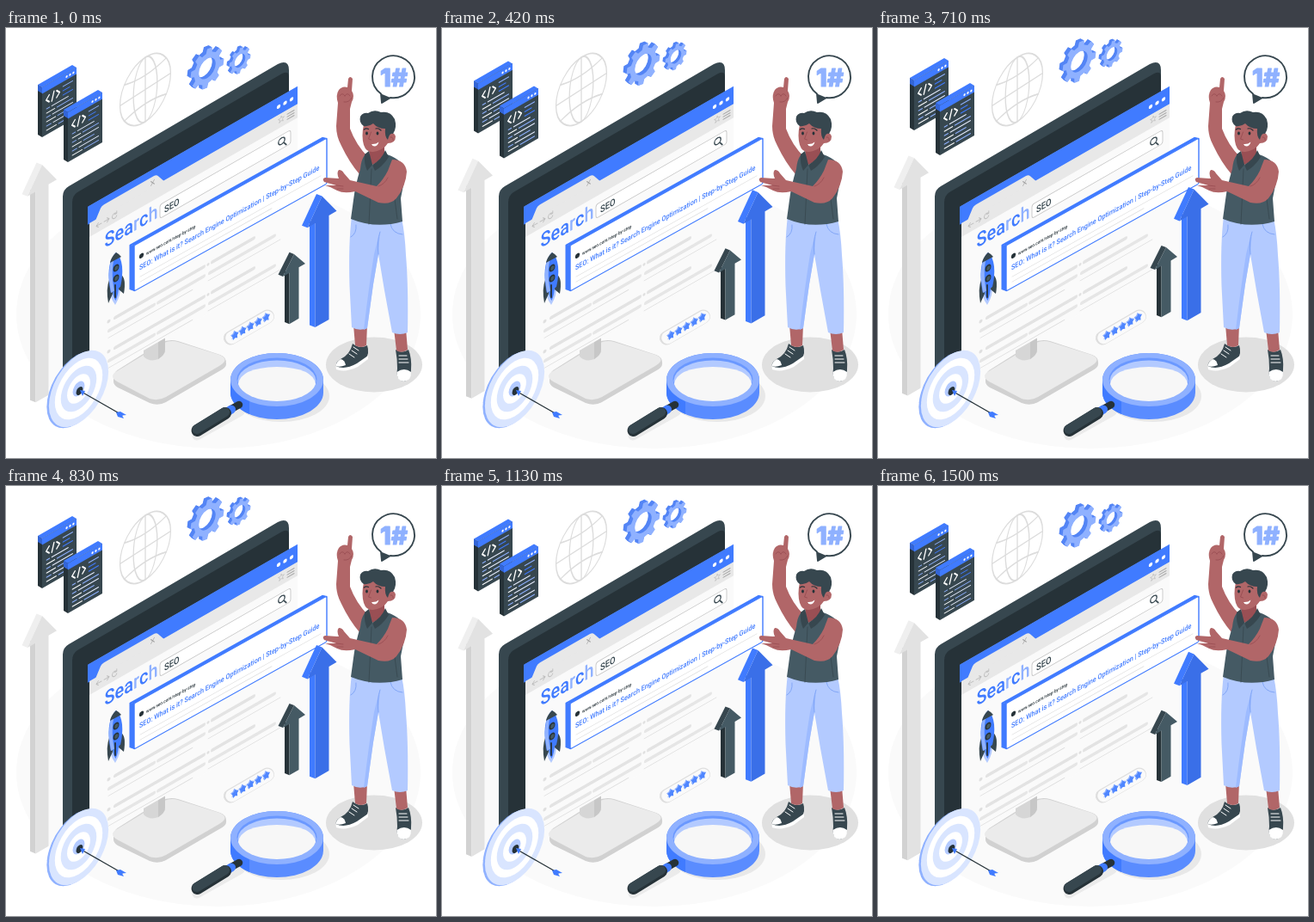
An HTML page for the animation above (1540 ms loop, 500 px wide and 500 px high).

```html
<!DOCTYPE html>
<html lang="en">
<head>
<meta charset="utf-8">
<title>SEO</title>
<style>
html, body { margin: 0; width: 100%; height: 100%; overflow: hidden; background: #fff; }
svg { display: block; width: 100vw; height: 100vh; }
text { font-family: Roboto, sans-serif; font-weight: 500; }
</style>
</head>
<body>
<svg viewBox="0 0 500 500" id="stage"></svg>
<script>
const LOOP = 1540, LIFT = 8;
const BLUE = '#407bff', DEEP = '#3365d6', SOFT = '#8fb1ff', PALE = '#b3caff', MIST = '#d9e5ff';
const INK = '#263238', SLATE = '#37474f', STEEL = '#455a64', SKIN = '#b16668', SHADE = '#9a4f54';

const path = (d, fill, more = '') => `<path d="${d}" fill="${fill}" ${more}/>`;
const line = (d, color, w = 1, more = '') =>
  path(d, 'none', `stroke="${color}" stroke-width="${w}" stroke-linecap="round" stroke-linejoin="round" ${more}`);
const poly = (pts, fill) => path('M' + pts.map(p => p.join(' ')).join('L') + 'Z', fill);
const oval = (x, y, rx, ry, fill, more = '') =>
  `<ellipse cx="${x}" cy="${y}" rx="${rx}" ry="${ry}" fill="${fill}" ${more}/>`;
const dot = (x, y, r, fill, more) => oval(x, y, r, r, fill, more);
const rect = (x, y, w, h, fill, more = '') =>
  `<rect x="${x}" y="${y}" width="${w}" height="${h}" fill="${fill}" ${more}/>`;
const group = (t, s) => `<g transform="${t}">${s}</g>`;
const bob = s => `<g class="bob">${s}</g>`;
const iso = (x, y, s) => group(`matrix(.866 -.5 0 1 ${x} ${y})`, s);
const label = (x, y, size, fill, s, weight = 500) =>
  group(`translate(${x} ${y}) scale(.866 1)`,
    `<text font-size="${size}" fill="${fill}" font-weight="${weight}">${s}</text>`);

// Extruded arrow pointing up; x, y is the front tip.
function arrow(x, y, w, tip, b, h, depth, front, side, headSide = side) {
  const at = (dx, dy) => [x + dx, y + dy - dx * .577];
  const back = ([px, py]) => [px - depth, py - depth * .4];
  const top = at(0, 0), left = at(-w, tip), neck = at(-b, tip), foot = at(-b, h);
  return poly([neck, foot, back(foot), back(neck)], side) +
    poly([top, left, back(left), back(top)], headSide) +
    poly([top, at(w, tip), at(b, tip), at(b, h), foot, neck, left], front);
}

function gear(x, y, r, teeth, depth) {
  const pts = [];
  for (let i = 0; i < teeth; i++) {
    [[-.3, .78], [-.19, 1], [.19, 1], [.3, .78]].forEach(([o, k]) => {
      const a = (i + o) / teeth * Math.PI * 2 + .15;
      pts.push((Math.cos(a) * r * k).toFixed(2) + ' ' + (Math.sin(a) * r * k).toFixed(2));
    });
  }
  const q = r * .5;
  const d = `M${pts.join('L')}ZM${q} 0A${q} ${q} 0 1 0 ${-q} 0A${q} ${q} 0 1 0 ${q} 0Z`;
  let s = '';
  for (let i = depth; i >= 0; i -= .5)
    s += iso(x - i, y - i * .55, path(d, i ? '#5485f5' : SOFT, 'fill-rule="evenodd"'));
  return s;
}

function codeWindow(x, y) {
  const p = (dx, dy) => [x + dx, y + dy];
  const s = poly([p(0, 0), p(-5, -3), p(-5, 55), p(0, 58)], INK) +
    poly([p(0, 0), p(-5, -3), p(35, -26), p(40, -23)], BLUE) +
    poly([p(0, 0), p(-5, -3), p(-5, 4), p(0, 7)], DEEP);
  let f = rect(0, 0, 46.2, 58, SLATE) + rect(0, 0, 46.2, 7.5, BLUE);
  [33, 37.5, 42].forEach(u => f += dot(u, 4, 1.3, '#fff'));
  f += line('M9.500 13.500L5.500 17.500L9.500 21.500M13 22.500L16 12.500M19.500 13.500L23.500 17.500L19.500 21.500', '#fff', 1.7);
  for (let i = 0; i < 3; i++) f += line(`M28 ${13 + i * 5}h${13 - i % 2 * 4}`, i ? BLUE : SOFT, 1.1);
  for (let i = 0; i < 6; i++) {
    const v = 28 + i * 5, cut = 10 + i * 7 % 13;
    f += line(`M6 ${v}H${cut}`, i % 2 ? '#fff' : SOFT, 1.1) +
      line(`M${cut + 3} ${v}H${i % 3 ? 41 : 35}`, i % 2 ? SOFT : '#e8eeff', 1.1);
  }
  return s + iso(x, y, f);
}

function star(x, y, r) {
  const pts = Array.from({ length: 10 }, (_, i) => {
    const a = i * Math.PI / 5 - Math.PI / 2, k = i % 2 ? r * .55 : r;
    return [Math.cos(a) * k, Math.sin(a) * k];
  });
  return iso(x - 1.2, y - .7, poly(pts, SOFT)) + iso(x, y, poly(pts, '#4f86ff'));
}

function globe() {
  const s = dot(0, 0, 34, 'none') + oval(0, 0, 16, 34, 'none') +
    line('M0 -34V34M-34 0H34M-28 -19Q0 -11 28 -19M-28 19Q0 11 28 19', '#dcdcdc', 1.5);
  return group('matrix(.866 -.56 0 1.1 162 71.5)', `<g stroke="#dcdcdc" stroke-width="1.5">${s}</g>`);
}

function monitor() {
  return path('M66 196Q66 188 73 184L316 42Q329 36 329 49V262L66 414Z', SLATE) +
    path('M77 203Q77 195 83 191L321 53Q329 49 329 57V262L77 408Z', INK) +
    path('M125 411V405Q125 400 134 395L180 366Q190 361 200 364L249 380Q257 383 256 391Q256 395 248 399L186 435Q177 440 167 436L130 418Q125 415 125 411Z', '#d1d1d1') +
    path('M129 399L180 368Q190 362 200 365L248 380Q261 385 248 393L186 429Q177 434 167 431L129 411Q119 405 129 399Z', '#ebebeb') +
    path('M160 372V382Q167 389 177 385Q185 380 185 374V355Z', '#d6d6d6') +
    path('M177 360V385Q185 380 185 374V352Z', '#c7c7c7');
}

function rocket() {
  return path('M122 303Q120 313 127 322Q134 311 133 298Z', PALE) +
    path('M124 304Q124 312 127.500 317Q131 309 131 300Z', BLUE) +
    path('M120 293Q116 303 119 320L124 309L123 300ZM134 287Q140 291 137 309L131 304L132 294Z', SLATE) +
    path('M128 261C118 271 118 290 122 308L133 301C137 284 136 268 128 261Z', BLUE) +
    path('M128 261C121 267 119.500 280 120 294L122 308L126 305.500C122.500 290 123 272 128 261Z', SOFT) +
    path('M128 261C123 266 121.500 270 121 273L134 266Q132 263 128 261Z', SLATE) +
    [279, 291].map(y => iso(128, y, dot(0, 0, 4, INK) + dot(.5, .3, 2.5, STEEL))).join('') +
    line('M127 299V313', INK, 1.8);
}

function page() {
  let s = rect(0, 0, 242, 204, '#fafafa') + rect(-2, -.5, 244, 21, BLUE) +
    rect(0, 20, 242, 16, '#e8e8e8') +
    path('M7 21L13 10Q14 8 17 8H75Q78 8 80 11L87 21Z', '#e8e8e8');
  [220, 227.5, 235].forEach(u => s += dot(u, 10.5, 2.2, '#fff'));
  s += line('M71.500 12.500l4 5m0 -5l-4 5', '#a6a6a6', .9) +
    line('M8 28h6m-6 0l2.500 -2.500m-2.500 2.500l2.500 2.500M17 28h6m0 0l-2.500 -2.500m2.500 2.500l-2.500 2.500', '#bdbdbd', .9) +
    line('M31.500 26.500a2.700 3 0 1 0 .3 2.500m0 -5v2.600h-2.500', '#bdbdbd', .9) +
    line('M223 23l1 2.400h2.500l-2 1.800l.8 2.800l-2.300 -1.600l-2.300 1.600l.8 -2.800l-2 -1.800h2.500Z', '#c4c4c4', .8) +
    line('M230 25h8m-8 3h8m-8 3h8', '#a6a6a6', 1.1);
  s += rect(82, 45.5, 152, 16, '#fff', 'rx="3" stroke="#c7c7c7" stroke-width=".9"') +
    label(87, 58, 11, SLATE, 'SEO', 700) +
    dot(223.5, 52.5, 3.7, 'none', `stroke="${SLATE}" stroke-width="1.3"`) + line('M226.300 56l2.700 4', SLATE, 1.3);
  const tints = [BLUE, BLUE, BLUE, SOFT, BLUE, SOFT];
  s += label(17.5, 59, 23, BLUE,
    [...'Search'].map((c, i) => `<tspan fill="${tints[i]}">${c}</tspan>`).join(''), 700);
  [147, 182].forEach(v => {
    s += dot(22.5, v, 2, '#e0e0e0') + line(`M30 ${v}H133`, '#e3e3e3', 4) +
      line(`M23 ${v + 11}H75M80 ${v + 11}H133`, '#e6e6e6', 4) + line(`M22 ${v + 19}H120`, '#dcdcdc', .8);
    s += dot(138, v, 1.6, '#e0e0e0') + line(`M143 ${v}H191`, '#e3e3e3', 4) +
      line(`M140 ${v + 11}H215`, '#e6e6e6', 4) + line(`M138 ${v + 19}H222`, '#dcdcdc', .8);
  });
  return group('matrix(1 -.573 0 1 97 207)', s);
}

function card() {
  const s = path('M0 0L-5 -3Q-6 -4 -5 -4H219L224 0ZM-5.500 -3.500V48L0 53V0Z', BLUE) +
    rect(0, 0, 224, 53, '#fff', `rx="1.5" stroke="${BLUE}" stroke-width="1.4"`) +
    dot(8.5, 16.5, 2.7, INK) +
    label(14, 19, 5.4, INK, 'www.seo.com/step-by-step') +
    label(6, 32, 8.35, BLUE, 'SEO: What is it? Search Engine Optimization | Step-by-Step Guide', 700) +
    line('M7 40H217M7 46H160', '#e0e0e0', .9);
  return group('matrix(1 -.558 0 1 149 253)', s);
}

function rating() {
  let s = line('M261 360.500L304 335.500', '#dedede', 16) + line('M262.500 360L304 336', '#fafafa', 14.5);
  for (let i = 0; i < 5; i++) s += star(266.5 + i * 9.1, 357.5 - i * 5.2, 5.2);
  return s;
}

function target() {
  const rings = [[40, MIST], [32, '#fff'], [24, MIST], [15.5, '#fff'], [8, PALE]];
  return iso(82, 420.5, dot(0, 0, 40, SOFT)) +
    iso(84.5, 419.5, rings.map(([r, c]) => dot(0, 0, r, c)).join('')) +
    iso(85.5, 422, dot(0, 0, 4.5, INK)) +
    line('M86 422L135 450', INK, 1.3) +
    path('M86 421L92 422L89 428Z', BLUE) +
    path('M128 447L133 446L140 450L135 450.500L137 454L130 452Z', BLUE);
}

function lens() {
  const ring = 'M261 409A54 31 0 0 1 369 409V424A54 31 0 0 1 261 424Z';
  return oval(320, 428, 56, 30, '#e8e8e8') + line('M222 474L272 446', '#ebebeb', 11) +
    path(ring, '#5a8cff') + path('M261 409V424A54 31 0 0 0 283 449V433Z', BLUE) +
    oval(315, 409, 54, 31, SOFT) +
    oval(315, 408.5, 46.5, 25, '#6a98ff') +
    oval(315, 410, 45.5, 23.5, PALE) +
    path('M270 414A45.500 23.500 0 0 0 360 414Q357 395 315 394Q273 395 270 414Z', '#f7f7f7') +
    line('M271 438L262 443', INK, 8.5) +
    line('M262 443.500L258 446', BLUE, 10, 'stroke-linecap="butt"') +
    line('M222.500 468L255 448', INK, 14) + line('M222 466.500L254.500 446.500', SLATE, 11);
}

function person() {
  const shoeL = path('M403 367Q412 374 420 369Q423 378 418 385L408 391Q393 400 385 396Q381 390 389 385Q400 380 403 367Z', SLATE) +
    path('M383.500 393Q394 398 408 390L421 381V385L409 394Q394 401 384 397Z', '#fff') +
    path('M389 385Q394 386 395 392Q388 395 383.500 393Q384 388 389 385Z', '#fff') +
    line('M399 379l6 4M402 375l6 4M404 371l6 4', '#fff', 1);
  const shoeR = path('M453 374Q460 379 468 374Q472 384 471 397Q471 410 462 411Q453 409 455 396Q455 384 453 374Z', SLATE) +
    path('M454.500 400Q463 394 471 400Q472 410 462 411Q454 410 454.500 400Z', '#fff') +
    line('M457 381h9M457 385h10M457 389h11', '#fff', 1);
  const legs = path('M404 345L406 369Q413 373 419 369L420 345ZM451 350L454 375Q460 379 467 374L465 350Z', SKIN) +
    path('M402 219Q398 250 399.500 300L402 348Q411 353 420 349L427 298L433 263L440 305L449 354Q458 358 467 354Q468 300 465 264Q464 240 460 221Z', PALE) +
    path('M433 263L435 237Q431 250 428 263Q422 300 416 351L420 349L427 298Z', '#9dbbff') +
    line('M433 263Q431 248 435 237M407 229Q408 239 401 243M447 228Q449 239 461 240', '#7da3f5', .9);
  const raised = path('M386 87Q383 78 387 72Q391 67 397 69L398 59Q400 55 403 59L402 73Q406 79 402 86L400 94L400 117Q407 136 421 150L411 170Q399 156 390 137Q384 126 384 114Z', SKIN) +
    line('M388 79Q391 74 394 79M394 79Q397 74 400 79M393 86Q399 87 402 81', SHADE, .9);
  const shirt = path('M422 142L424 160L440 152V138Z', SHADE) +
    path('M417 148Q413 153 412 164Q406 183 404 200L401 222Q430 234 461 225L459 198L465 168Q463 154 443 147L427 160Z', STEEL) +
    path('M417 147L422 143L426 159L420 166Q416 157 417 147ZM441 142L445 150Q438 161 429 166L426 159Q437 153 441 142Z', SLATE) +
    line('M425 164L422 228M452 199L455 222', SLATE, .8);
  const arm = path('M449 153Q464 153 466 167Q465 184 454 198Q447 206 433 203L406 190Q393 193 385 189L377 185L371 183L384 183L370 179Q367 175 371 174L387 175Q384 168 387 165Q391 165 393 169L400 177L431 184Q439 176 444 166Z', SKIN) +
    line('M433 184Q440 182 444 174M384 183L392 184M385 187L392 187', SHADE, .9);
  const head = path('M424 140L426 154Q437 151 441 136Z', SHADE) +
    path('M416 112Q413 126 416 136Q419 145 427 144Q439 142 444 134Q453 134 453 126Q451 120 445 123L442 105Q428 101 416 112Z', SKIN) +
    path('M416 114Q410 110 412 103Q415 98 421 99Q428 94 436 98Q447 96 452 106Q455 116 450 123Q446 121 444 130Q440 126 441 117Q432 117 427 111Q422 115 416 114Z', SLATE) +
    oval(419.500, 122.500, 1.4, 2, INK) + oval(432, 122.500, 1.4, 2, INK) +
    line('M416.500 118Q418.500 116 421.500 117.500M430 117Q433 116 436 119', INK, 1.2) +
    line('M424.500 121L421.500 129L424.500 130M447 127Q450 126 450 130', SHADE, 1) +
    path('M425 135Q430 135.500 433.500 132.500Q432 137.500 428.500 137.500Q426 137.500 425 135Z', '#fff');
  return oval(428, 391.5, 56, 32, '#e0e0e0') + shoeL + shoeR + legs + raised + shirt + arm + head;
}

function bubble() {
  const edge = `stroke="${SLATE}" stroke-width="1.9" stroke-linejoin="round"`;
  return path('M436 76.500L437 87L447 81A24.500 24.500 0 1 0 436 76.500Z', '#fff', edge) +
    path('M436 76.500L437 87L447 81Z', SLATE) +
    `<text x="451" y="68" font-size="29" text-anchor="middle" fill="${SOFT}" stroke="${SOFT}" stroke-width="1.2" stroke-linejoin="round" style="font-family:Inter,sans-serif;font-weight:800">1#</text>`;
}

document.getElementById('stage').innerHTML =
  oval(247, 333, 235, 156, '#fafafa') +
  bob(arrow(42, 159, 17, 27, 7.5, 272, 6.5, '#e2e2e2', '#d2d2d2', '#efefef')) +
  globe() +
  bob(gear(234, 47, 22.5, 8, 4) + gear(272, 38, 14.5, 8, 3)) +
  bob(codeWindow(42, 69) + codeWindow(72, 98)) +
  monitor() + page() + rocket() + card() + rating() +
  bob(arrow(335, 263, 13, 18.5, 5.5, 78, 5.5, STEEL, INK, SLATE) +
    arrow(367.5, 195.5, 17, 27, 8, 148, 6.5, '#3a6fe8', BLUE)) +
  target() + lens() + person() + bubble();

const floaters = document.querySelectorAll('.bob');
function draw() {
  const phase = performance.now() % LOOP / LOOP;
  const y = -LIFT / 2 * (1 - Math.cos(phase * Math.PI * 2));
  floaters.forEach(g => g.setAttribute('transform', `translate(0 ${y.toFixed(3)})`));
  requestAnimationFrame(draw);
}
draw();
</script>
</body>
</html>
```
